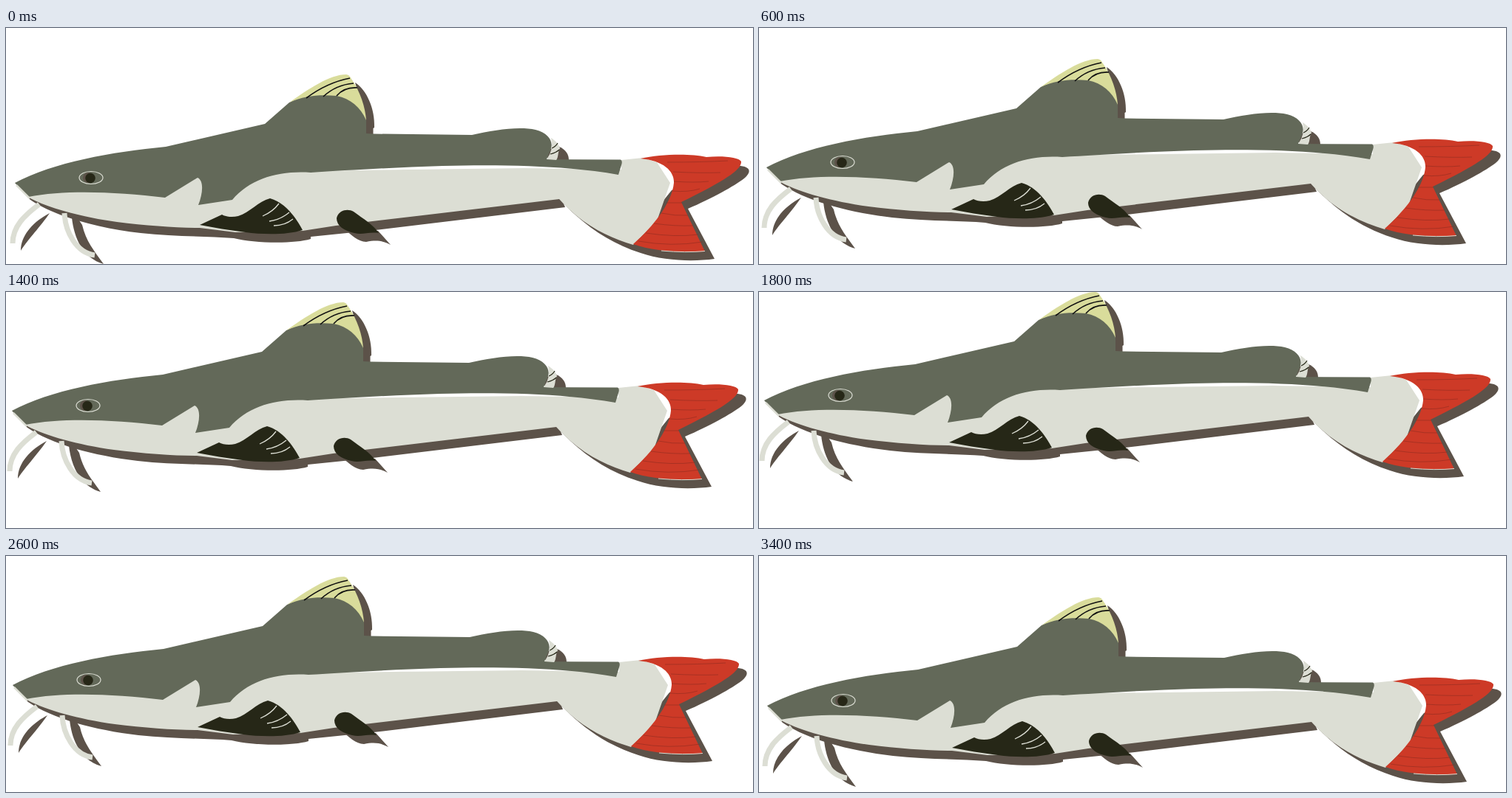
Write an HTML page that moves like this. It is 1010 px wide and 320 px high and loops after 3.6 s.

```html
<!DOCTYPE html>
<html lang="en">
<head>
<meta charset="utf-8">
<title>Catfish</title>
<style>
  html, body { margin: 0; width: 100%; height: 100%; overflow: hidden; background: #fff; }
  svg { display: block; width: 1010px; height: 320px; }
  .shade { fill: #5c5249; }
  .pale { fill: #dcded4; }
  .back { fill: #636959; }
  .dark { fill: #262717; }
  .red { fill: #cd3a27; }
  .yellow { fill: #d9dc9b; }
  .line { fill: none; }
</style>
</head>
<body>
<svg viewBox="0 0 1010 320">
  <g id="fish">
    <!-- shadow -->
    <g class="shade">
      <path d="M22 222L33 233C65 255 122 271 182 278C226 283 270 282 308 285C335 292 390 293 412 286L412 283L500 274L756 243L748 225L400 240L60 235Z"/>
      <path d="M472 74C488 84 499 110 498 135L496.500 136V146H484L478 95Z"/>
      <path d="M748 161C757 165 761 171 761 180H732V165Z"/>
      <path d="M748 232C782 268 815 291 858 305C890 316 930 317 958 313L922 245C955 231 985 214 998 204C1010 194 1005 187 990 187L900 220L848 285Z"/>
      <path d="M59 251C38 262 20 280 20 302C27 290 46 270 59 251Z"/>
      <path d="M89 257C92 285 104 312 132 320C119 302 108 289 103 267L97 258Z"/>
      <path d="M457 273C467 280 476 290 487 290C502 287 511 289 520 294L503 275Z"/>
    </g>

    <!-- belly and tail -->
    <path class="pale" d="M12 210L33 231C58 244 100 256 150 263C190 268 230 271 262 271L310 277L401 275L446 268L748 232C780 268 815 284 848 294L880 262L898 210L880 182L861 176L832 179V192L700 190L300 195L100 212Z"/>
    <path class="red" d="M858 177C885 171 925 170 947 175C968 173 991 175 994 181C995 192 972 207 913 236L945 303C910 305 872 302 848 293C882 263 901 232 903 210C904 195 890 180 858 177Z"/>
    <path class="line" stroke="#dcded4" d="M886 302Q920 305 945 302.500"/>
    <path class="line" stroke="#8f2c20" stroke-width=".6" d="M894 182Q940 182 976 180M902 195Q938 197 966 196M903 208Q930 210 950 208M901 221Q922 223 938 218M893 237H914M886 251Q905 255 922 254M876 265Q905 269 929 268M865 278Q905 284 936 280M855 289Q900 297 942 290"/>

    <!-- back -->
    <path class="back" d="M12 210C64 182 143 168 216 161L350 130L383 101C410 88 430 86 455 92C475 98 485 113 487 125V143L497 143.500L630 145C660 138 694 133 716 138C735 143 742 156 735 168L731 178L831 178.500Q834 180 832 186L828 199C760 187 680 185 590 187C525 189 460 193 412 196C370 193 330 204 306 233L260 240C266 225 268 207 259 203L215 230C150 222 80 219 30 229Z"/>
    <path class="line" stroke="#dcded4" stroke-width="2.500" d="M14 213L32 231"/>

    <!-- upper fins -->
    <path class="yellow" d="M383 101C410 82 438 63 460 63Q464 63 467 69C479 86 486 108 487 125C479 107 466 96 447 92C426 90 404 91 383 101Z"/>
    <path class="line" stroke="#111" stroke-width="1.6" d="M465 68Q434 74 406 95M470 75Q446 77 429 93M475 81Q457 80 447 92"/>
    <path class="pale" d="M737 149C743 153 748 158 749 163C746 167 747 176 744 179L731 178Q741 165 737 149Z"/>
    <path class="line" stroke="#262717" stroke-width="1.2" d="M738 163Q743 161 746 156M736 171Q744 169 748 165"/>

    <!-- lower fins -->
    <path class="dark" d="M262 267L292 253C297 256 306 257 314 255C330 250 341 235 357 231C378 237 392 257 401 274C380 281 346 280 324 277C302 274 282 271 262 267Z"/>
    <path class="line" stroke="#dcded4" stroke-width="1.3" d="M369 238Q361 249 347 255M383 250Q371 260 356 262M388 259Q377 268 362 268"/>
    <path class="dark" d="M447 258C449 247 462 244 470 249C483 259 495 265 504 278C490 276 482 281 471 278C457 275 447 268 447 258Z"/>

    <!-- eye -->
    <ellipse cx="115" cy="203" rx="16" ry="8.500" fill="#636959" stroke="#dcded4" stroke-width="1.2"/>
    <circle class="shade" cx="111" cy="203" r="7"/>
    <circle class="dark" cx="114" cy="203.500" r="6.800"/>

    <!-- barbels -->
    <path class="line" stroke="#dcded4" stroke-width="7" d="M45 239C25 254 9 269 9 292M79 251C80 276 95 305 120 308"/>
  </g>
</svg>
<script>
  const STEP = 200, TOP = 9;
  const fish = document.getElementById('fish');

  // Nine steps up, nine steps down, on whole pixels.
  function draw() {
    const n = Math.floor(performance.now() / STEP) % (2 * TOP);
    const k = n > TOP ? 2 * TOP - n : n;
    fish.setAttribute('transform', `translate(${-Math.round(k * 5 / TOP)} ${-7 * k})`);
    requestAnimationFrame(draw);
  }
  draw();
</script>
</body>
</html>
```
